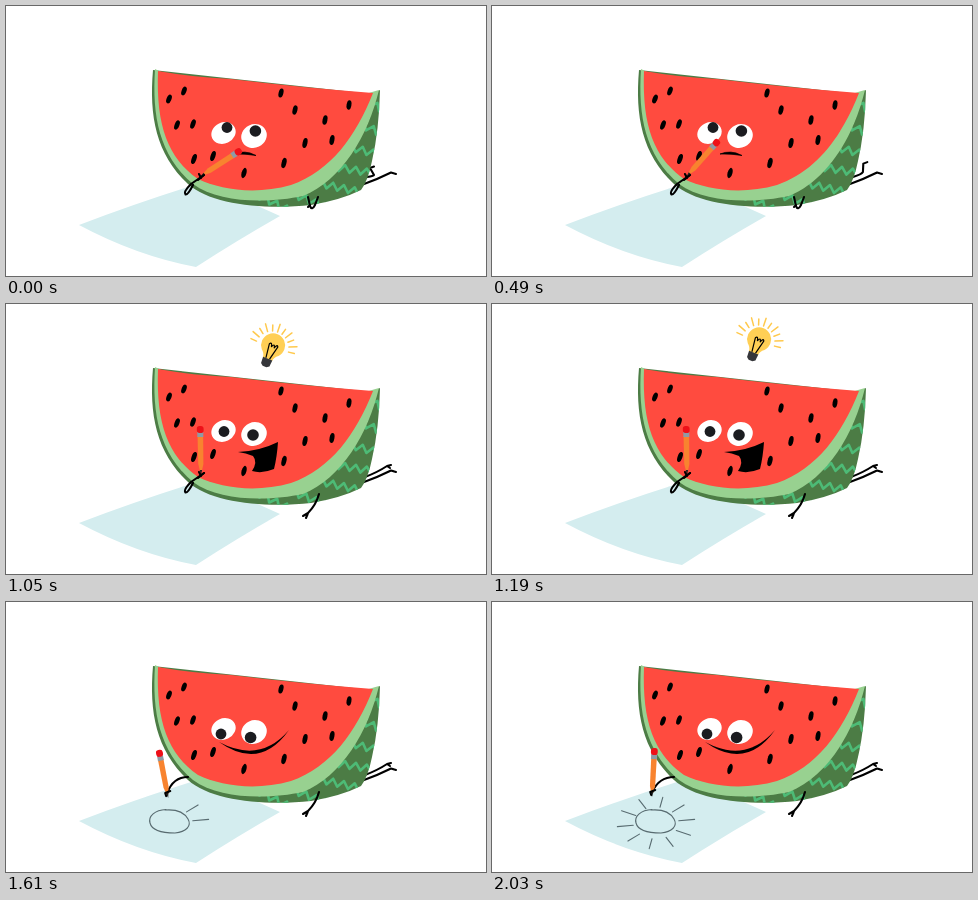
Animation of 480x270 px, one loop 2100 ms. Source, as an HTML page:

```html
<!DOCTYPE html>
<html lang="en">
<head>
<meta charset="utf-8">
<title>Watermelon has an idea</title>
<style>
  html, body { margin: 0; width: 100%; height: 100%; overflow: hidden; background: #fff; }
  svg { display: block; width: 100vw; height: 100vh; }
  .line { fill: none; stroke: #000; stroke-width: 2.1; stroke-linecap: round; stroke-linejoin: round; }
  .sketch { fill: none; stroke: #586b70; stroke-width: 1.1; stroke-linecap: round; }
  .zig { fill: none; stroke: #4dbb76; stroke-width: 2.6; stroke-linejoin: round; }
  .ray { stroke: #ffc94d; stroke-width: 1.5; stroke-linecap: round; }
</style>
</head>
<body>
<svg viewBox="0 0 480 270">
  <defs>
    <path id="skin" d="M147 64C143 110 150 148 182 178C205 199 260 204 305 199Q335 194 355 184Q362 175 366 155Q373 125 374 84L366 88Z"/>
    <clipPath id="skinClip"><use href="#skin"/></clipPath>
  </defs>

  <path fill="#d4edef" d="M73 219Q125 199 185 180L245 197L274 210Q230 235 190 261Q131 250 73 219Z"/>
  <g class="sketch">
    <path id="sun" pathLength="100" stroke-dasharray="100 200"
      d="M160 207.500C149 208 142 214 144 221C146 229 158 231 169 231C180 230 186 224 182 217C178 210 171 207 159 208"/>
    <g id="beams"></g>
  </g>

  <path class="line" d="M358 178Q372 173 385 166.500L390 168"/>
  <path id="leg" class="line"/>

  <use href="#skin" fill="#4c7c45"/>
  <g id="stripes" class="zig" clip-path="url(#skinClip)"></g>
  <path fill="#98d190" d="M149 63C146 110 153 149 187 178C214 198 264 197 297 190C336 174 362 130 373 84L366 86L260 120L153 65Z"/>
  <path fill="#ff4b3f" d="M152 65Q185 71 225 73Q290 81 367 87C350 130 325 165 285 179C250 189 215 184 192 173C162 152 150 120 152 65Z"/>
  <g id="seeds"></g>

  <g fill="#fff">
    <ellipse rx="12.500" ry="10.500" transform="translate(217.500 127) rotate(-25)"/>
    <ellipse rx="13" ry="11.700" transform="translate(248 130) rotate(-25)"/>
  </g>
  <g fill="#1b1c20">
    <circle id="pupilL" r="5.400"/>
    <circle id="pupilR" r="5.800"/>
  </g>
  <path id="frown" d="M228 148Q239 143.500 250 149.500Q239 147.500 228 148Z" stroke="#000" stroke-width=".7"/>
  <path id="gasp" d="M232 148Q254 147 272 138Q271 153 268 165Q256 170 246 167Q252 158 247 152Q240 149 232 148Z"/>
  <path id="smile" d="M213 140Q254 169 283 128Q254 162 213 140Z"/>

  <path id="hand" class="line"/>
  <path id="arm" class="line"/>
  <g id="pencil">
    <path fill="#f8832f" d="M-.9 -3L-2.600 -10L-2.800 -38H2.800L2.600 -10L.9 -3Z"/>
    <path fill="#222" d="M0 1L-1.200 -4H1.200Z"/>
    <path fill="#8f9aa5" d="M-3 -42H3V-37H-3Z"/>
    <rect x="-3.400" y="-48" width="6.800" height="7" rx="2.800" fill="#ee1018"/>
  </g>
  <path id="fingers" class="line"/>

  <g id="bulb">
    <g id="glow"></g>
    <path fill="#ffcf55" d="M-5 12Q-5 8 -9 5A12 12 0 1 1 9 5Q5 8 5 12Z"/>
    <path class="line" style="stroke-width:1.200" d="M-2 11L-4 -3Q-2 -6 -1 -1Q1 -6 2 -1Q4 -6 5 -3L2 11"/>
    <path fill="#35363a" d="M-5 11.500H5L4.500 18L2 20H-2L-4.500 18Z"/>
  </g>
</svg>

<script>
const STEP = 70, LOOP = 2100;
const IDEA = 910, REACH = 1190, SMILE = 1260, DRAW = 1330, SHINE = 1540;
const RAD = Math.PI / 180;
const $ = id => document.getElementById(id);

function add(parent, tag, attrs) {
  const el = document.createElementNS('http://www.w3.org/2000/svg', tag);
  for (const k in attrs) el.setAttribute(k, attrs[k]);
  $(parent).append(el);
  return el;
}
const repeat = (n, make) => Array.from({ length: n }, (_, i) => make(i));
const show = (el, on) => el.setAttribute('visibility', on ? 'visible' : 'hidden');
const path = (id, d) => $(id).setAttribute('d', d);
const place = (id, x, y, rest = '') => $(id).setAttribute('transform', `translate(${x} ${y}) ${rest}`);
const mix = (a, b, k) => a + (b - a) * k;
const progress = (t, from, to) => Math.max(0, Math.min(1, (t - from) / (to - from)));
const onEllipse = (cx, cy, rx, ry, deg) => [cx + rx * Math.cos(deg * RAD), cy + ry * Math.sin(deg * RAD)];

// Seeds stand more upright to the right and shrink towards the top
'163,93 178,85 171,119 187,118 188,153 207,150 238,167 278,157 299,137 326,134 319,114 343,99 289,104 275,87'
  .split(' ').map(p => p.split(',')).forEach(([x, y]) =>
    add('seeds', 'ellipse', {
      rx: 2.4, ry: 3.8 + y / 110,
      transform: `translate(${x} ${y}) rotate(${22 - (x - 160) * .07})`
    }));

// Zigzags start along the rind and run out to the edge of the skin
repeat(7, i => {
  const [x, y] = onEllipse(250, 95, 110, 93, i * 15);
  add('stripes', 'polyline', {
    points: repeat(11, n => [n * 5.5, n % 2 ? 3.5 : -3.5]).join(' '),
    transform: `translate(${x} ${y}) rotate(${18 + 9 * Math.cos(i)})`
  });
});

const beams = repeat(10, i => {
  const deg = -44 + i * 36;
  return add('beams', 'path', {
    d: `M${onEllipse(164, 221, 23, 16, deg)}L${onEllipse(164, 221, 39, 26, deg)}`
  });
});

const rays = repeat(11, i =>
  add('glow', 'line', { class: 'ray', x1: 0, x2: 0, y1: -17, transform: `rotate(${-88 + i * 17})` }));

const swing = t => (1 - Math.cos(t / 650 * 2 * Math.PI)) / 2;

// Pencil point and lean: tapping the face, then scribbling on the sheet
function grip(t) {
  const a = (t - DRAW) / 560 * 2 * Math.PI, c = Math.cos(a), s = Math.sin(a);
  const k = progress(t, REACH, DRAW);
  const lean = mix(57 - 32 * swing(t), -1, progress(t, 840, 980));
  return [
    mix(195, 164 + 2 * c - 4 * s, k),
    mix(170, 198.5 + 3.5 * c - 4.5 * s, k),
    mix(lean, 3 + 14 * c, k)
  ];
}

function drawArm(t) {
  const [x, y, lean] = grip(t);
  place('pencil', x, y, `rotate(${lean})`);
  if (t < SMILE) {
    path('arm', 'M198 169L185 178Q177 186 179.500 188.500Q182 189 187 179');
    path('fingers', 'M198 169L192 174M193 168L195 172');
    return;
  }
  const hx = x + 4 * Math.sin(lean * RAD), hy = y - 4 * Math.cos(lean * RAD);
  const bend = progress(t, DRAW, DRAW + STEP);
  path('arm', `M182 175Q${mix(182, 167, bend)} ${mix(191, 175, bend)} ${hx} ${hy}`);
  path('fingers', `M${hx + 3} ${hy - 2}L${hx - 2} ${hy}l1 3`);
}

function drawLimbs(t) {
  const s = swing(t), happy = t >= IDEA;
  path('leg', happy
    ? 'M359 173Q372 168 381 162L385 161M381 162L384 164'
    : `M361 171Q${mix(368, 371, s)} ${mix(170, 167, s)} ${mix(368, 374, s)} ${mix(169, 163, s)}` +
      `L${mix(364, 379, s)} ${mix(162, 153, s)}l4 -1.500`);
  path('hand', happy
    ? 'M313 190Q310 201 302 209L300 214M302 209L297 212M302 209L301 212'
    : 'M302 191L304 200Q306 205 309 199L312 191M304 199L302 201');
}

function drawFace(t) {
  const [dx, dy] = t < IDEA ? [3, -6] : t < SMILE ? [0, 0] : [-3, 4.5];
  place('pupilL', 218 + dx, 127.5 + dy);
  place('pupilR', 247 + dx * .8, 131 + dy);
  show($('frown'), t < IDEA);
  show($('gasp'), t >= IDEA && t < SMILE);
  show($('smile'), t >= SMILE);
}

function drawBulb(t) {
  const lift = 12 * progress(t, 1120, SMILE);
  show($('bulb'), t >= IDEA && t < DRAW);
  place('bulb', 266, 44 - lift, `rotate(22) scale(${mix(.6, 1, progress(t, IDEA, IDEA + STEP))})`);
  const reach = t / STEP % 2 ? 23 : 26;
  rays.forEach((ray, i) => ray.setAttribute('y2', -reach - i % 2 * 2));
}

function drawSketch(t) {
  const done = progress(t, DRAW, SHINE);
  show($('sun'), done > 0);
  $('sun').setAttribute('stroke-dashoffset', 100 * (1 - done));
  beams.forEach((beam, i) => show(beam, t >= SHINE + i * 50));
}

function render(now) {
  const t = Math.floor(now % LOOP / STEP) * STEP;
  for (const draw of [drawLimbs, drawFace, drawArm, drawBulb, drawSketch]) draw(t);
}

const start = performance.now();
function tick() {
  render(performance.now() - start);
  requestAnimationFrame(tick);
}
tick();
</script>
</body>
</html>
```
